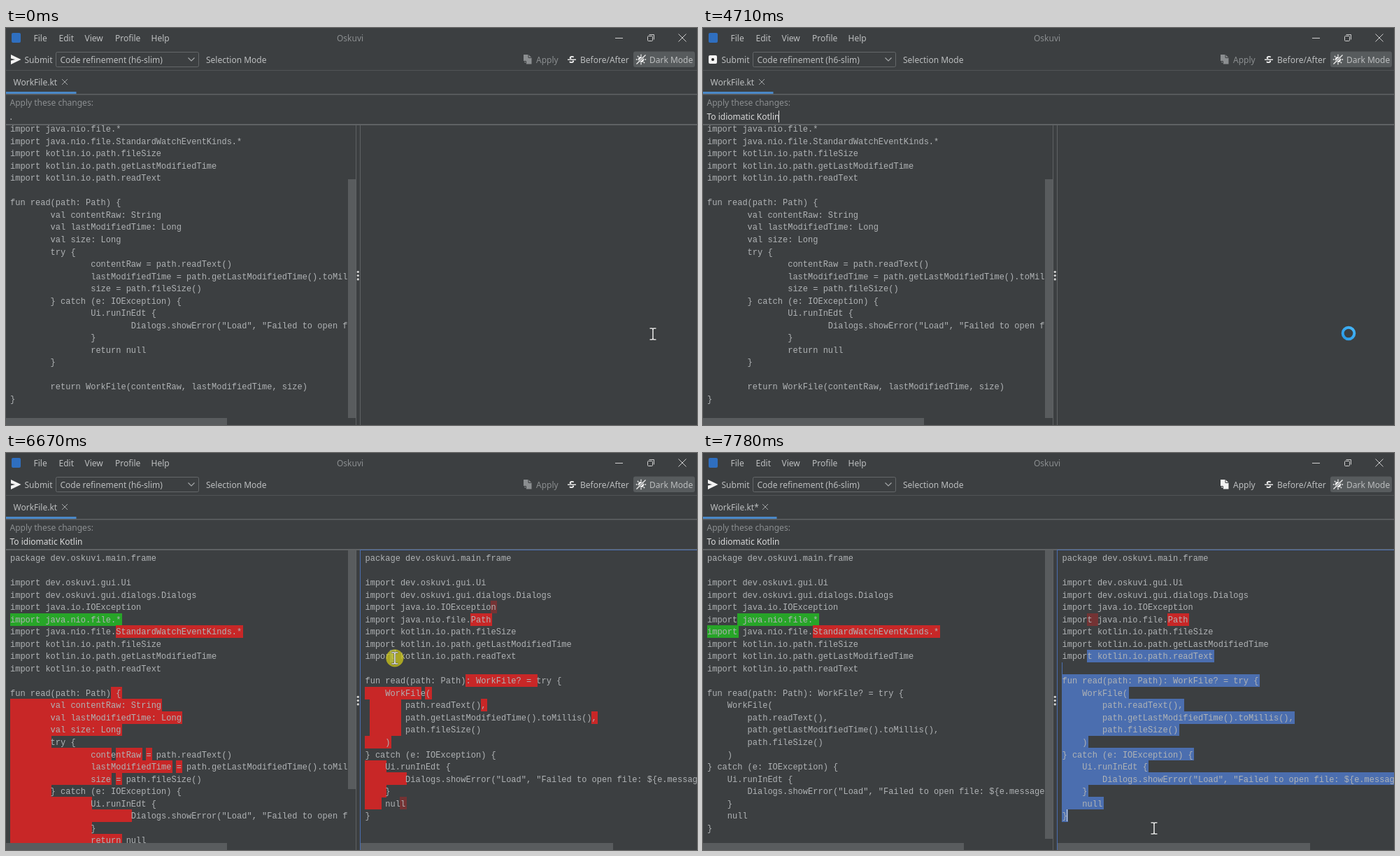
An HTML page with a canvas that plays this animation: 988x567 px, repeating every 8.16 s.

```html
<!DOCTYPE html>
<html lang="en">
<head>
<meta charset="utf-8">
<title>Code refinement</title>
<style>
html, body { margin: 0; width: 100%; height: 100%; overflow: hidden; background: #3c3f41; }
canvas { display: block; width: 988px; height: 567px; }
</style>
</head>
<body>
<canvas id="stage" width="988" height="567"></canvas>
<script>
const ctx = document.getElementById("stage").getContext("2d");
const LOOP = 8160;
const CHAR = 7.2, ROW = 17.52, TOP = 141.5;
const UI_FONT = '12px "Noto Sans", "Open Sans", sans-serif';
const CODE_FONT = '12px "Liberation Mono", monospace';
const BG = "#3c3f41", FG = "#bcbebf", DIM = "#8b8e90", LINE = "#5f6264", WHITE = "#f2f2f2";
const CODE = "#b0b3b5", INPUT = "#dadada";
const THUMB = "#595c5e", BLUE = "#4b6eaf", RED = "#c82727", GREEN = "#27a528";
const PROMPT = "To idiomatic Kotlin";

const TIME = {
  submit: 2010, result: 4810, move: 5490, press: 6480, drag: 6690, release: 7120, apply: 7550
};

// Marks in code lines: «changed», ‹slightly changed›, [moved]
const MARKS = { "«": RED, "‹": "rgba(150,45,45,.62)", "[": GREEN };

const head = [
  "package dev.oskuvi.main.frame", "",
  "import dev.oskuvi.gui.Ui",
  "import dev.oskuvi.gui.dialogs.Dialogs"
];
const pathImports = [
  "import kotlin.io.path.fileSize",
  "import kotlin.io.path.getLastModifiedTime",
  "import kotlin.io.path.readText", ""
];
const oldBody = [
  "fun read(path: Path)« {»",
  "«        val contentRaw: String»",
  "«        val lastModifiedTime: Long»",
  "«        val size: Long»",
  "«        »try {",
  "«                cont»e«ntRaw» «=» path.readText()",
  "«                lastModifiedTime» «=» path.getLastModifiedTime().toMillis()",
  "«                size» «=» path.fileSize()",
  "«        »} catch (e: IOException) {",
  "«                »Ui.runInEdt {",
  "«                        »Dialogs.showError(\"Load\", \"Failed to open file: ${e.message}\")",
  "«                »}",
  "«                return» null",
  "        }", "",
  "        return WorkFile(contentRaw, lastModifiedTime, size)",
  "}"
];
const newBody = [
  "fun read(path: Path)«: WorkFile? = »try {",
  "«    WorkFil»e«(»",
  " «      » path.readText()«,»",
  " «      » path.getLastModifiedTime().toMillis()«,»",
  " «      » path.fileSize()",
  "«    )»",
  "} catch (e: IOException) {",
  "«    »Ui.runInEdt {",
  "«        »Dialogs.showError(\"Load\", \"Failed to open file: ${e.message}\")",
  "«    »}",
  "«   » nul‹l›",
  "}"
];

const plain = s => s.replace(/[«»‹›\[\]]/g, "");

function parse(line) {
  const spans = [];
  let col = 0, open = null;
  for (const c of line) {
    if (MARKS[c]) open = { from: col, color: MARKS[c] };
    else if ("»›]".includes(c)) spans.push({ ...open, to: col });
    else col++;
  }
  return { text: plain(line), spans };
}

const build = (imports, body) => [...head, ...imports, ...pathImports, ...body].map(parse);
const watchImport = "java.nio.file.«StandardWatchEventKinds.*»";
const leftDiff = build(
  ["import java.io.IOException", "[import java.nio.file.*]", "import " + watchImport], oldBody);
const leftStart = leftDiff.map(l => ({ text: l.text, spans: [] }));
const leftDone = build(
  ["import java.io.IOException", "import[ java.nio.file.*]", "[import] " + watchImport],
  newBody.map(plain));
const rightDiff = build(["import java.io.IOExceptio‹n›", "import java.nio.file.«Path»"], newBody);
const rightDone = build(
  ["import java.io.IOException", "impor‹t ›java.nio.file.«Path»"], newBody.map(plain));

function rect(x, y, w, h, color) {
  ctx.fillStyle = color;
  ctx.fillRect(x, y, w, h);
}

function label(text, x, y, color = FG) {
  ctx.font = UI_FONT;
  ctx.fillStyle = color;
  ctx.fillText(text, x, y);
}

function stroke(points, color = FG, width = 1) {
  ctx.strokeStyle = color;
  ctx.lineWidth = width;
  ctx.beginPath();
  points.forEach(([x, y], i) => i ? ctx.lineTo(x, y) : ctx.moveTo(x, y));
  ctx.stroke();
}

function shape(points, color) {
  ctx.fillStyle = color;
  ctx.beginPath();
  points.forEach(([x, y]) => ctx.lineTo(x, y));
  ctx.fill();
}

function rounded(x, y, w, h, r, fill, border) {
  ctx.beginPath();
  ctx.roundRect(x, y, w, h, r);
  if (fill) { ctx.fillStyle = fill; ctx.fill(); }
  if (border) { ctx.strokeStyle = border; ctx.lineWidth = 1; ctx.stroke(); }
}

function disc(x, y, r, color) {
  ctx.fillStyle = color;
  ctx.beginPath();
  ctx.arc(x, y, r, 0, 7);
  ctx.fill();
}

function cross(x, y, r, color = FG) {
  stroke([[x - r, y - r], [x + r, y + r]], color);
  stroke([[x + r, y - r], [x - r, y + r]], color);
}

function drawTitleBar() {
  rounded(8, 7, 13, 14, 2, "#2f6fc0");
  [["File", 39.5], ["Edit", 75.5], ["View", 112.5], ["Profile", 156], ["Help", 207.5]]
    .forEach(([s, x]) => label(s, x, 18.5));
  ctx.textAlign = "center";
  label("Oskuvi", 492, 18.5, DIM);
  ctx.textAlign = "left";
  stroke([[871, 14.5], [882, 14.5]], "#d0d0d0");
  rounded(917.5, 11.5, 7, 7, 1, null, "#d0d0d0");
  stroke([[919.5, 9.5], [926.5, 9.5], [926.5, 16.5]], "#d0d0d0");
  cross(967, 14, 5.5, "#d0d0d0");
}

function drawToolbar(busy, canApply) {
  if (busy) {
    rounded(8, 39, 12, 12, 2, WHITE);
    disc(14, 45, 2, "#222");
  } else {
    shape([[7, 38], [21.5, 45], [7, 52], [7, 46.5], [13, 45], [7, 43.5]], WHITE);
  }
  label("Submit", 26.5, 49.5);
  rounded(71.5, 34.5, 204, 21, 2, BG, "#65686a");
  label("Code refinement (h6-slim)", 77.5, 49.5);
  stroke([[260.5, 42.5], [265, 47], [269.5, 42.5]], "#a4a7a9", 1.2);
  label("Selection Mode", 286, 49.5);

  const applyColor = canApply ? WHITE : "#8b8e90";
  shape([[740, 38], [747, 38], [751.5, 42.5], [751.5, 51.5], [744, 51.5], [740, 47]], applyColor);
  stroke([[747, 38], [747, 42.5], [751.5, 42.5]], BG);
  stroke([[739.5, 47.5], [743.5, 47.5], [743.5, 51.5]], BG);
  label("Apply", 758, 49.5, canApply ? FG : DIM);

  ctx.font = 'bold 14px "Noto Sans", sans-serif';
  ctx.fillStyle = WHITE;
  ctx.fillText("S", 805, 50);
  rect(803, 44, 12, 2.6, BG);
  rect(803, 44.5, 12, 1.4, WHITE);
  label("Before/After", 821, 49.5);

  rounded(897, 33.5, 88, 22.5, 3, "#575b5d");
  disc(908, 45, 4.2, WHITE);
  for (let i = 0; i < 8; i++) {
    const c = Math.cos(i * Math.PI / 4), s = Math.sin(i * Math.PI / 4);
    stroke([[908 + 5 * c, 45 + 5 * s], [908 + 7.2 * c, 45 + 7.2 * s]], WHITE, 1.3);
  }
  stroke([[901.5, 51.5], [914.5, 38.5]], "#575b5d", 3);
  stroke([[901.5, 51.5], [914.5, 38.5]], WHITE, 1.2);
  label("Dark Mode", 920, 49.5);
  rect(0, 60, 988, 1, "#505355");
}

function drawTab(modified) {
  label(modified ? "WorkFile.kt*" : "WorkFile.kt", 10.5, 81.5);
  const grow = modified ? 5 : 0;
  cross(84 + grow, 77, 4, "#a4a7a9");
  rect(0, 94, 988, 1.5, LINE);
  rect(0, 91, 100.5 + grow, 3, "#4a88c7");
}

function typedCount(t) {
  if (t < 1010) return 0;
  if (t < 1320) return t < 1090 ? 1 : t < 1160 ? 2 : 3;
  return Math.min(PROMPT.length, 4 + Math.floor((t - 1320) / 37));
}

function promptCaretOn(t) {
  if (t < 1910) return t >= 190 && t < 660 || t >= 940;
  if (t >= TIME.press) return false;
  if (t >= 4710) return t < 5090 || Math.floor((t - 5090) / 280) % 2 === 1;
  return Math.floor((t - 1910) / 280) % 2 === 0;
}

function drawPrompt(t) {
  label("Apply these changes:", 5.5, 110.5, DIM);
  const text = PROMPT.slice(0, typedCount(t));
  label(text, 5.5, 131, INPUT);
  if (promptCaretOn(t)) {
    const x = text ? 5 + ctx.measureText(text).width : 7;
    rect(Math.floor(x), 118, 1, 17, INPUT);
  } else if (t < 190) {
    rect(6.5, 129.5, 1.5, 1.5, FG);
  }
  rect(0, 137, 988, 2, LINE);
}

function drawCode(lines, x, scroll, selection) {
  ctx.font = CODE_FONT;
  lines.forEach(({ text, spans }, row) => {
    const y = TOP + row * ROW - scroll;
    const fill = (from, to, color) => {
      const left = Math.floor(x + from * CHAR);
      const right = Math.ceil(x + to * CHAR + 1);
      rect(left, Math.floor(y), right - left, 18, color);
    };
    if (selection && row >= selection.row && row <= selection.endRow) {
      const from = row === selection.row ? selection.col : 0;
      const to = row === selection.endRow ? selection.endCol : text.length;
      if (to > from) fill(from, to, BLUE);
      else if (!text) rect(Math.floor(x), Math.floor(y), 1, 18, BLUE);
    }
    spans.forEach(s => fill(s.from, s.to, s.color));
    ctx.fillStyle = CODE;
    ctx.fillText(text, x, y + 12.7);
  });
}

function clipped(x, y, w, h, draw) {
  ctx.save();
  ctx.beginPath();
  ctx.rect(x, y, w, h);
  ctx.clip();
  draw();
  ctx.restore();
}

function selectionAt(mouse) {
  const endRow = Math.min(rightDiff.length - 1, Math.floor((mouse.y - TOP) / ROW));
  const col = Math.round((mouse.x - 513.5) / CHAR);
  const endCol = Math.max(0, Math.min(rightDiff[endRow].text.length, col));
  return { row: 8, col: 5, endRow, endCol };
}

function drawPanes(t, mouse) {
  const hasResult = t >= TIME.result, applied = t >= TIME.apply, focused = t >= TIME.press;
  const left = applied ? leftDone : hasResult ? leftDiff : leftStart;
  clipped(0, 139, 489, 418, () => drawCode(left, 6, hasResult ? 0 : 93.5));
  if (applied) rect(489, 139, 11, 412, THUMB);
  else if (hasResult) rect(489, 139, 11, 341, THUMB);
  else rect(489, 216, 11, 341, THUMB);
  rect(0, 557, applied ? 373 : 316, 10, THUMB);

  rect(500, 138, 1, 429, LINE);
  rect(506, 138, 1, 429, LINE);
  for (let i = -1; i < 2; i++) disc(503.3, 353.6 + i * 5.3, 1.6, "#d5d5d5");

  if (!hasResult) return;
  const selection = focused ? selectionAt(mouse) : null;
  clipped(507, 139, 481, 418, () => {
    drawCode(applied ? rightDone : rightDiff, 513.5, 0, selection);
    if (focused) {
      const { endRow, endCol } = selection;
      rect(Math.round(513.5 + endCol * CHAR - .5), Math.floor(TOP + endRow * ROW), 1, 17, INPUT);
    }
  });
  rect(507, 557, 361, 10, THUMB);
  if (focused) {
    rect(506, 138, 482, 1, BLUE);
    rect(506, 138, 1, 429, BLUE);
  }
}

const path = [
  [TIME.move, 925, 437], [5840, 648, 204], [6300, 553, 288], [TIME.press, 551, 292],
  [TIME.drag, 556, 293], [TIME.release, 630, 523], [7270, 631, 525], [7780, 645, 536]
];

function mouseAt(t) {
  const next = path.findIndex(p => p[0] > t);
  if (next === 0) return { x: path[0][1], y: path[0][2] };
  if (next < 0) return { x: path.at(-1)[1], y: path.at(-1)[2] };
  const a = path[next - 1], b = path[next];
  const k = (t - a[0]) / (b[0] - a[0]);
  const e = k * k * (3 - 2 * k);
  return { x: a[1] + (b[1] - a[1]) * e, y: a[2] + (b[2] - a[2]) * e };
}

function drawSpinner(t) {
  const turn = Math.floor((t - TIME.submit) / 100) * Math.PI / 4;
  const ring = ctx.createConicGradient(turn, 923, 436);
  ring.addColorStop(0, "#2a9be8");
  ring.addColorStop(.5, "#45b5f8");
  ring.addColorStop(1, "#2a9be8");
  ctx.strokeStyle = ring;
  ctx.lineWidth = 4;
  ctx.beginPath();
  ctx.arc(923, 436, 8.3, 0, 7);
  ctx.stroke();
}

function drawIBeam({ x, y }) {
  for (const [color, width] of [["#26282a", 2.4], ["#e8e8e8", 1.6]]) {
    stroke([[x, y - 8], [x, y + 8]], color, width);
    for (const s of [-1, 1]) {
      stroke([[x - 4.5, y + 8 * s], [x - 1, y + 8 * s], [x, y + 7 * s],
        [x + 1, y + 8 * s], [x + 4.5, y + 8 * s]], color, width);
    }
  }
}

function draw(t) {
  const mouse = mouseAt(t);
  const busy = t >= TIME.submit && t < TIME.result;
  rect(0, 0, 988, 567, BG);
  drawTitleBar();
  drawToolbar(busy, t >= TIME.release);
  drawTab(t >= TIME.apply);
  drawPrompt(t);
  drawPanes(t, mouse);
  if (t >= TIME.press && t < TIME.release) disc(mouse.x, mouse.y, 12.5, "rgba(205,200,25,.75)");
  if (busy) drawSpinner(t);
  else drawIBeam(mouse);
}

const start = performance.now();
function tick() {
  draw((performance.now() - start) % LOOP);
  requestAnimationFrame(tick);
}
tick();
</script>
</body>
</html>
```
